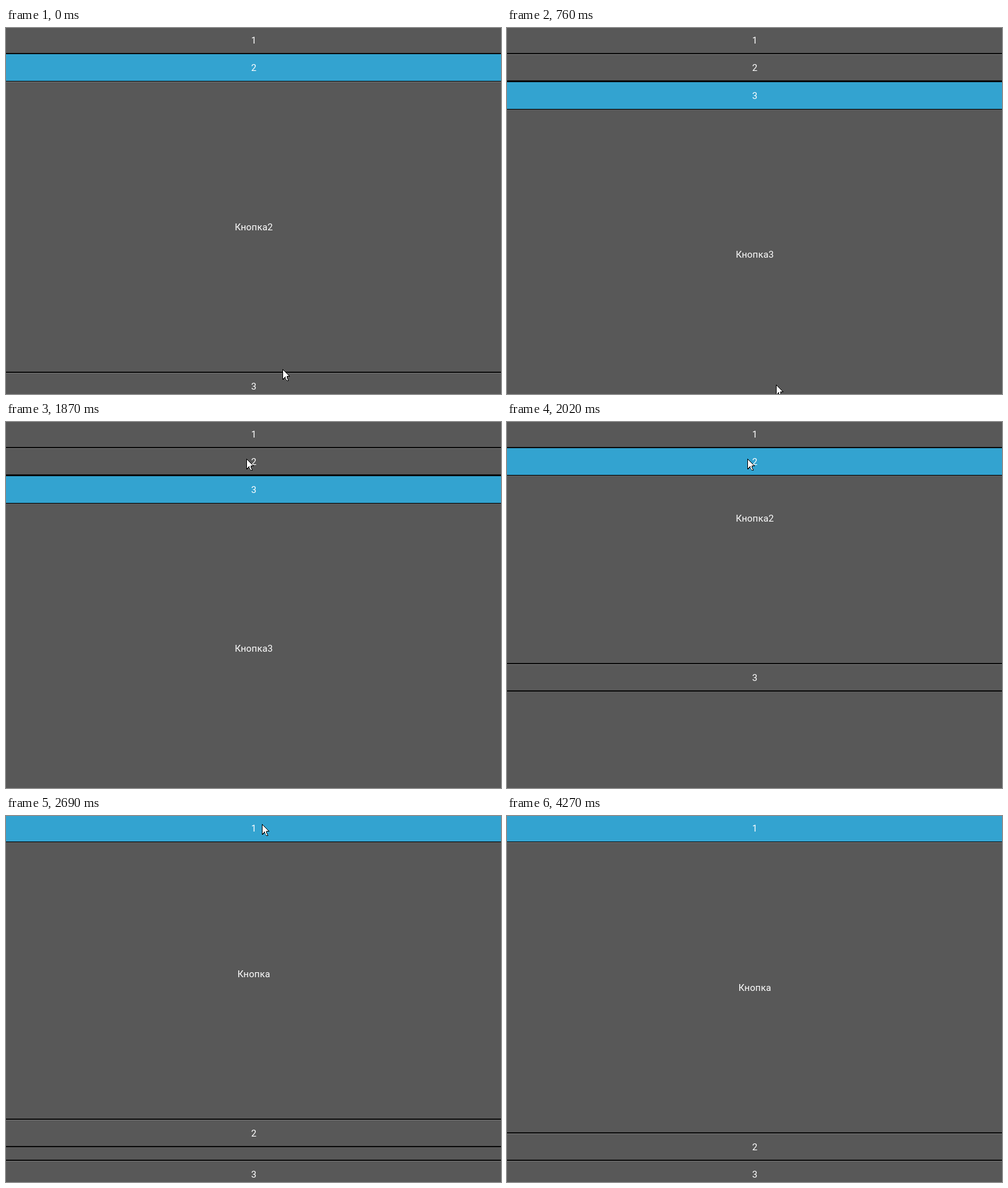
Recreate the animation shown at these times as an HTML page. Size 795 px wide and 588 px high, loop 4390 ms.

```html
<!DOCTYPE html>
<html lang="ru">
<head>
<meta charset="utf-8">
<title>Аккордеон</title>
<style>
  html, body { margin: 0; width: 100%; height: 100%; overflow: hidden; background: #585858; }
  #stage { position: relative; width: 795px; height: 588px; overflow: hidden; }
  .item { position: absolute; left: -2px; width: 800px; overflow: hidden; }
  .btn {
    position: absolute; left: 0; width: 100%;
    background: #585858;
    box-shadow: inset 0 -1px #000, inset 0 -2px #161616, inset 0 1px #777;
    color: #fff; text-align: center; white-space: pre;
    font: 15px/44px Roboto, "Open Sans", sans-serif;
  }
  .head { top: 0; height: 44px; }
  .body { bottom: 0; height: 468px; line-height: 468px; letter-spacing: .15px; }
  .open .head { background: #33a3d0; box-shadow: inset 0 -1px #000; }
  #cursor { position: absolute; left: 0; top: 0; shape-rendering: crispEdges; }
</style>
</head>
<body>
<div id="stage">
  <div class="item"><div class="btn body">Кнопка</div><div class="btn head">1</div></div>
  <div class="item"><div class="btn body">Кнопка2</div><div class="btn head">2</div></div>
  <div class="item"><div class="btn body">Кнопка3</div><div class="btn head">3</div></div>
  <svg id="cursor" width="12" height="19">
    <path d="M0 0H.5L12 11.5V12H8V14L10 18L9 19H7L4.5 13.5L1 17H0Z"/>
    <path d="M1 1.5L10.5 11H7V14L9 18H7L5 14V12H4.5L1 15.5Z" fill="#fff"/>
  </svg>
</div>
<script>
  const LOOP = 4390, TICK = 120, HEAD = 44, BODY = 468, TOP = -2, ANIM = 250;

  // pointer strokes: start, number of even jumps (one per tick), end x, end y
  const strokes = [
    [0, 1, 444, 548], [120, 1, 431, 560], [270, 1, 430, 572], [640, 2, 432, 573],
    [1030, 1, 406, 376], [1180, 1, 353, 32], [1330, 2, 368, 103], [1600, 2, 385, 55],
    [1870, 1, 386, 59], [2140, 2, 398, 56], [2410, 1, 411, 13], [2930, 2, 408, 50],
    [3320, 1, 423, 88]
  ];
  const POINTER_GONE = 3440;

  // opened item, time it shows, animation time already spent by then
  const opens = [
    { item: 1, start: 0, lead: ANIM },
    { item: 2, start: 520, lead: 0 },
    { item: 1, start: 2020, lead: 37.5 },
    { item: 0, start: 2690, lead: 110 }
  ];
  const REDRAWS = 2; // the picture settles after this many ticks

  const items = [...document.querySelectorAll('.item')];
  const cursor = document.getElementById('cursor');
  const ticks = (t, start) => Math.floor((t - start) / TICK);
  const outExpo = p => p >= 1 ? 1 : 1 - 2 ** (-10 * p);

  function drawItems(t) {
    const n = opens.findLastIndex(o => o.start <= t);
    const { item: to, start, lead } = opens[n];
    const from = opens.at(n - 1).item;
    const run = lead + Math.min(ticks(t, start), REDRAWS) * TICK;
    const grow = Math.round(BODY * outExpo(run / ANIM));
    let y = TOP;
    items.forEach((el, i) => {
      const room = i === to ? grow : i === from ? BODY - grow : 0;
      el.style.top = y + 'px';
      el.style.height = HEAD + room + 'px';
      el.classList.toggle('open', i === to);
      y += HEAD + room;
    });
  }

  function drawPointer(t) {
    const n = strokes.findLastIndex(s => s[0] <= t);
    const [start, jumps, x, y] = strokes[n];
    const [, , x0, y0] = strokes[Math.max(n - 1, 0)];
    const p = Math.min((ticks(t, start) + 1) / jumps, 1);
    const mix = (a, b) => Math.round(a + (b - a) * p);
    cursor.style.left = mix(x0, x) + 'px';
    cursor.style.top = mix(y0, y) + 'px';
    cursor.style.visibility = t < POINTER_GONE ? 'visible' : 'hidden';
  }

  const origin = performance.now();
  function frame() {
    const t = (performance.now() - origin) % LOOP;
    drawItems(t);
    drawPointer(t);
    requestAnimationFrame(frame);
  }
  frame();
</script>
</body>
</html>
```
